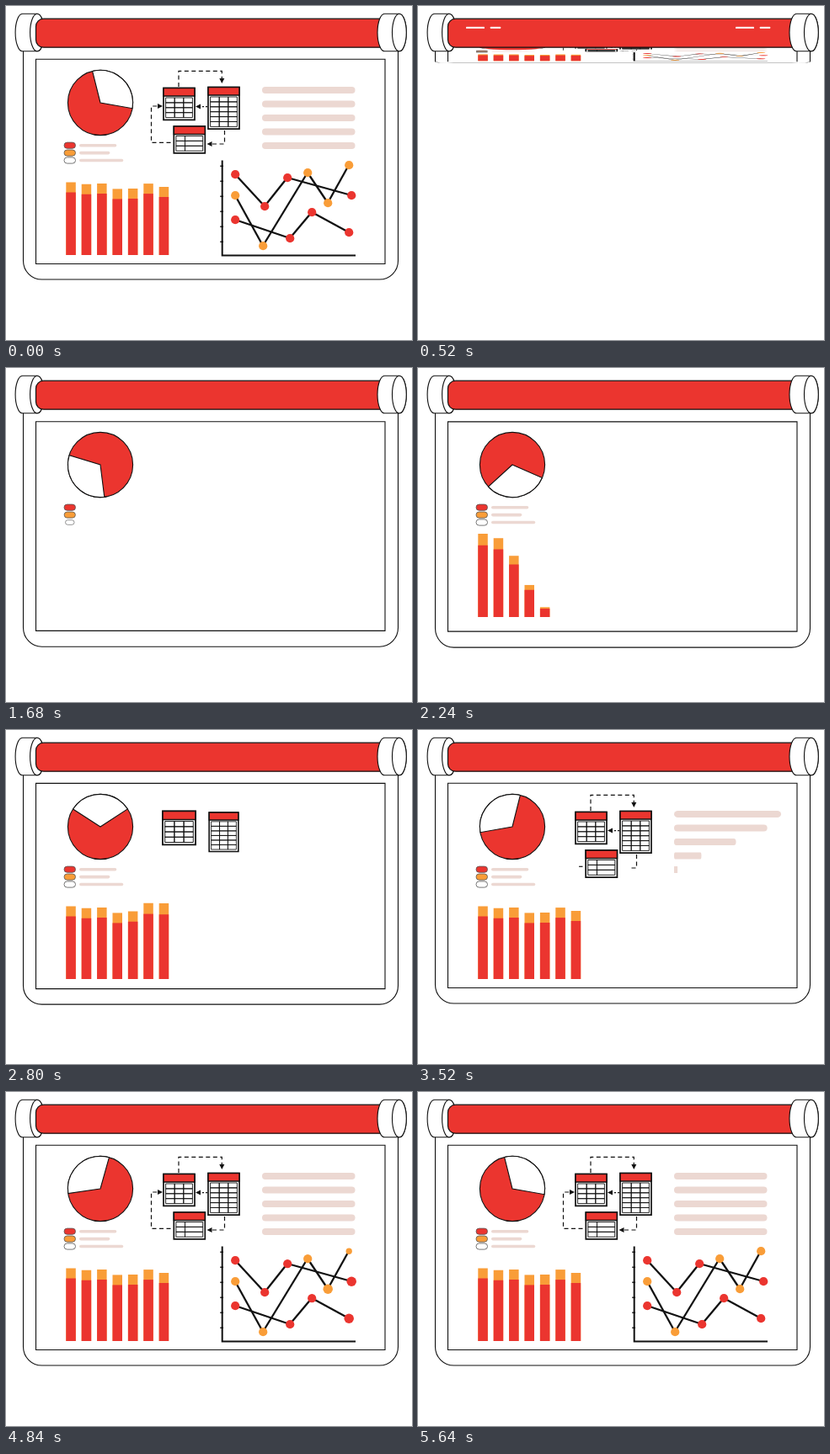
An HTML page with a canvas that plays this animation: 482x397 px, repeating every 5.68 s.

```html
<!DOCTYPE html>
<html lang="en">
<head>
<meta charset="utf-8">
<title>Presentation screen</title>
<style>
html, body { margin: 0; width: 100%; height: 100%; overflow: hidden; background: #fff; }
canvas { display: block; width: 482px; height: 397px; }
</style>
</head>
<body>
<canvas></canvas>
<script>
const LOOP = 5680, RED = '#eb352f', ORANGE = '#f99d38', PINK = '#ecd8d2', INK = '#111';
const TAU = Math.PI * 2, POP = 360, STAGGER = 80;
const canvas = document.querySelector('canvas');
const c = canvas.getContext('2d');
const dpr = window.devicePixelRatio || 1;
canvas.width = 482 * dpr;
canvas.height = 397 * dpr;

// Timing
const span = (t, start, length) => Math.min(1, Math.max(0, (t - start) / length));
const smooth = p => p * p * (3 - 2 * p);
const cubic = p => p < .5 ? 4 * p ** 3 : 1 - 4 * (1 - p) ** 3;
const grow = (t, start) => smooth(span(t, start, POP));
const pop = (t, start) => 1.15 * grow(t, start) - .15 * grow(t, start + POP);

// The sheet rolls up, then drops at a steady speed and rings like a spring
function sheetScale(t) {
  if (t < 720) return 1 - cubic(span(t, 120, 560));
  const land = 1186, period = .472, u = (t - land) / 1000;
  if (u < 0) return span(t, 955, land - 955);
  return u > 4 * period ? 1 : 1 + .188 * Math.sin(TAU * u / period) * Math.exp(-1.9 * u);
}

// Drawing helpers
function paint(fill, stroke, width = 1.1) {
  if (fill) { c.fillStyle = fill; c.fill(); }
  if (stroke) { c.strokeStyle = stroke; c.lineWidth = width; c.stroke(); }
}
function box(x, y, w, h, r, fill, stroke, width) {
  c.beginPath();
  c.roundRect(x, y, w, h, r);
  paint(fill, stroke, width);
}
function oval(x, y, rx, ry, fill, stroke) {
  c.beginPath();
  c.ellipse(x, y, rx, ry, 0, 0, TAU);
  paint(fill, stroke);
}
function scaled(x, y, sx, sy, draw) {
  if (sx <= 0 || sy <= 0) return;
  c.save();
  c.translate(x, y);
  c.scale(sx, sy);
  c.translate(-x, -y);
  draw();
  c.restore();
}
// Strokes the first part of a polyline
function trace(points, part, width, dash = []) {
  if (part <= 0) return;
  const lengths = points.slice(1).map((p, i) => Math.hypot(p[0] - points[i][0], p[1] - points[i][1]));
  let left = part * lengths.reduce((a, b) => a + b);
  c.beginPath();
  c.moveTo(...points[0]);
  lengths.forEach((len, i) => {
    if (left <= 0) return;
    const k = Math.min(1, left / len), [x, y] = points[i], [X, Y] = points[i + 1];
    c.lineTo(x + (X - x) * k, y + (Y - y) * k);
    left -= len;
  });
  c.setLineDash(dash);
  paint(null, INK, width);
  c.setLineDash([]);
}

function pie(t) {
  const x = 112, y = 115, r = 38.6, size = grow(t, 1230), half = 57;
  const mid = 141 - 274 * cubic(span(t, 1480, 2000)) + 86 * cubic(span(t, 4680, 960));
  scaled(x, y, size, size, () => {
    oval(x, y, r, r, RED, INK);
    c.beginPath();
    c.moveTo(x, y);
    c.arc(x, y, r, (mid - half) * TAU / 360, (mid + half) * TAU / 360);
    c.closePath();
    paint('#fff', INK);
  });
}

function legend(t) {
  [RED, ORANGE, '#fff'].forEach((color, i) => {
    const y = 165.7 + 8.9 * i, delay = STAGGER * i, s = grow(t, 1270 + delay);
    const width = 44.3 - 9.2 * Math.sin(i * TAU / 3);
    scaled(75.8, y, s, s, () => box(69, y - 3.6, 13.5, 7.2, 3.6, color, '#555', .8));
    scaled(87, y, grow(t, 1700 + delay), 1, () => box(87, y - 1.8, width, 3.6, 1.8, PINK));
  });
}

// Bar heights follow a falling trend with two waves
function bars(t) {
  const floor = 296;
  for (let i = 0; i < 7; i++) {
    const x = 71.3 + 18.4 * i;
    const h = 85.3 - .9 * i + 2.6 * Math.cos(i * TAU / 6) + 2.8 * Math.cos((i - 2) * TAU / 3);
    scaled(x, floor, 1, pop(t, 1840 + STAGGER * i), () => {
      box(x, floor - h, 11.5, h, 0, ORANGE);
      box(x, floor - h + 12, 11.5, h - 12, 0, RED);
    });
  }
}

function table(t, start, x, y, cols, rows) {
  const w = 37, head = 9.5, cell = 5.9, gw = w - 5.2, gh = cell * rows, h = gh + 14.2;
  const gx = x + 2.6, gy = y + head + 2, s = pop(t, start);
  scaled(x + w / 2, y + h / 2, s, s, () => {
    box(x, y, w, h, 0, '#fff', INK, 1.7);
    box(x, y, w, head, 0, RED, INK, 1.5);
    c.beginPath();
    c.rect(gx, gy, gw, gh);
    for (let i = 1; i < cols; i++) c.rect(gx + gw * i / 3, gy, 0, gh);
    for (let i = 1; i < rows; i++) c.rect(gx, gy + cell * i, gw, 0);
    paint(null, INK, .9);
  });
}

// Dashed path of alternating vertical and horizontal steps, ending in a head
function arrow(t, start, x, y, steps, dash = [5, 3.5]) {
  const points = [[x, y]], part = span(t, start, 280);
  steps.forEach((d, i) => {
    i % 2 ? x += d : y += d;
    points.push([x, y]);
  });
  trace(points, part, 1.2, dash);
  if (part < 1) return;
  const way = Math.sign(steps.at(-1)) * 3;
  const [dx, dy] = steps.length % 2 ? [0, way] : [way, 0];
  c.beginPath();
  c.moveTo(x + dx, y + dy);
  c.lineTo(x - dx + dy, y - dy + dx);
  c.lineTo(x - dx - dy, y - dy - dx);
  paint(INK);
}

function diagram(t) {
  const tableAt = i => 2230 + 310 * i, arrowAt = i => 2980 + 175 * i;
  table(t, tableAt(0), 187, 97.5, 3, 4);
  table(t, tableAt(1), 240, 96.5, 3, 6);
  table(t, tableAt(2), 199.3, 143, 2, 3);
  arrow(t, arrowAt(0), 205, 96, [-18.7, 51.3, 11.7]);
  arrow(t, arrowAt(1), 239, 119.6, [0, -11], [2, 2]);
  arrow(t, arrowAt(2), 259.5, 148, [16, -18]);
  arrow(t, arrowAt(3), 195.5, 162.3, [0, -23, -43.3, 10.5]);
}

function textLines(t) {
  for (let i = 0; i < 5; i++) {
    const y = 100 + 16.5 * i;
    scaled(304, y, pop(t, 3162 + STAGGER * i), 1, () => box(304, y - 4, 110.5, 8, 4, PINK));
  }
}

const series = [
  { color: RED, points: [[272, 200], [307, 238], [334, 204], [410, 225]] },
  { color: ORANGE, points: [[272, 225], [305, 285], [358, 198], [382, 234], [407, 189]] },
  { color: RED, points: [[272, 254], [337, 276], [363, 245], [407, 269]] }
];
function chart(t) {
  const step = 240, at = i => 3670 + step * i, left = 256.7, floor = 296.5;
  trace([[left, 183.5], [left, floor], [415, floor]], smooth(span(t, 3560, 440)), 2);
  for (let i = 0; i < 6; i++) {
    const y = 190.3 + 18 * i;
    trace([[left - 2.4, y], [left + 1.3, y]], span(t, 3600 + 40 * i, 80), 1.5);
  }
  for (const { points } of series)
    for (let i = 1; i < points.length; i++)
      trace([points[i - 1], points[i]], smooth(span(t, at(i - 1), step)), 2.3);
  for (const { color, points } of series)
    points.forEach(([x, y], i) => {
      const r = 5.1 * pop(t, at(i));
      oval(x + .2, y + .2, r, r, color);
    });
}

function contents(t) {
  for (const draw of [pie, legend, bars, diagram, textLines, chart]) draw(t);
}

function sheet(t) {
  const top = 42, rollingUp = t < 720;
  scaled(0, top, 1, sheetScale(t), () => {
    box(20.5, top, 445, 325 - top, [0, 0, 22, 22], '#fff', INK);
    box(35.5, 63.3, 414.5, 243.2, 0, '#fff', INK);
    if (rollingUp) contents(LOOP);
  });
  if (!rollingUp) contents(t);
}

function cap(x) {
  const y = 31.5, rx = 8.4, ry = 22.3, face = x + 17.5;
  c.beginPath();
  c.ellipse(x, y, rx, ry, 0, TAU / 4, TAU * 3 / 4);
  c.ellipse(face, y, rx, ry, 0, -TAU / 4, TAU / 4);
  c.closePath();
  paint('#fff', INK);
  oval(face, y, rx, ry, '#fff', INK);
}

function glints(t) {
  const opening = t > 930 && t < 1200, closing = t > 240 && t < 640;
  if (!opening && !closing) return;
  const turn = (opening ? t : LOOP - t) / 200 + .48, y = 17 + 28 * (turn % 1);
  for (const x of [57, 377]) {
    box(x, y, 22, 2, .5, '#fff');
    box(x + 28.8, y, 12.4, 2, .5, '#fff');
  }
}

function roller(t) {
  const stretch = 1 + .025 * Math.sin(Math.PI * span(t, 720, 220));
  scaled(243, 0, stretch, 1, () => {
    cap(19.5);
    box(35.5, 15.2, 420, 34, [9, 0, 0, 9], RED, INK, 1.2);
    glints(t);
    cap(449.4);
  });
}

const origin = performance.now();
function frame() {
  const t = (performance.now() - origin) % LOOP;
  c.setTransform(dpr, 0, 0, dpr, 0, 0);
  c.fillStyle = '#fff';
  c.fillRect(0, 0, 482, 397);
  sheet(t);
  roller(t);
  requestAnimationFrame(frame);
}
frame();
</script>
</body>
</html>
```
